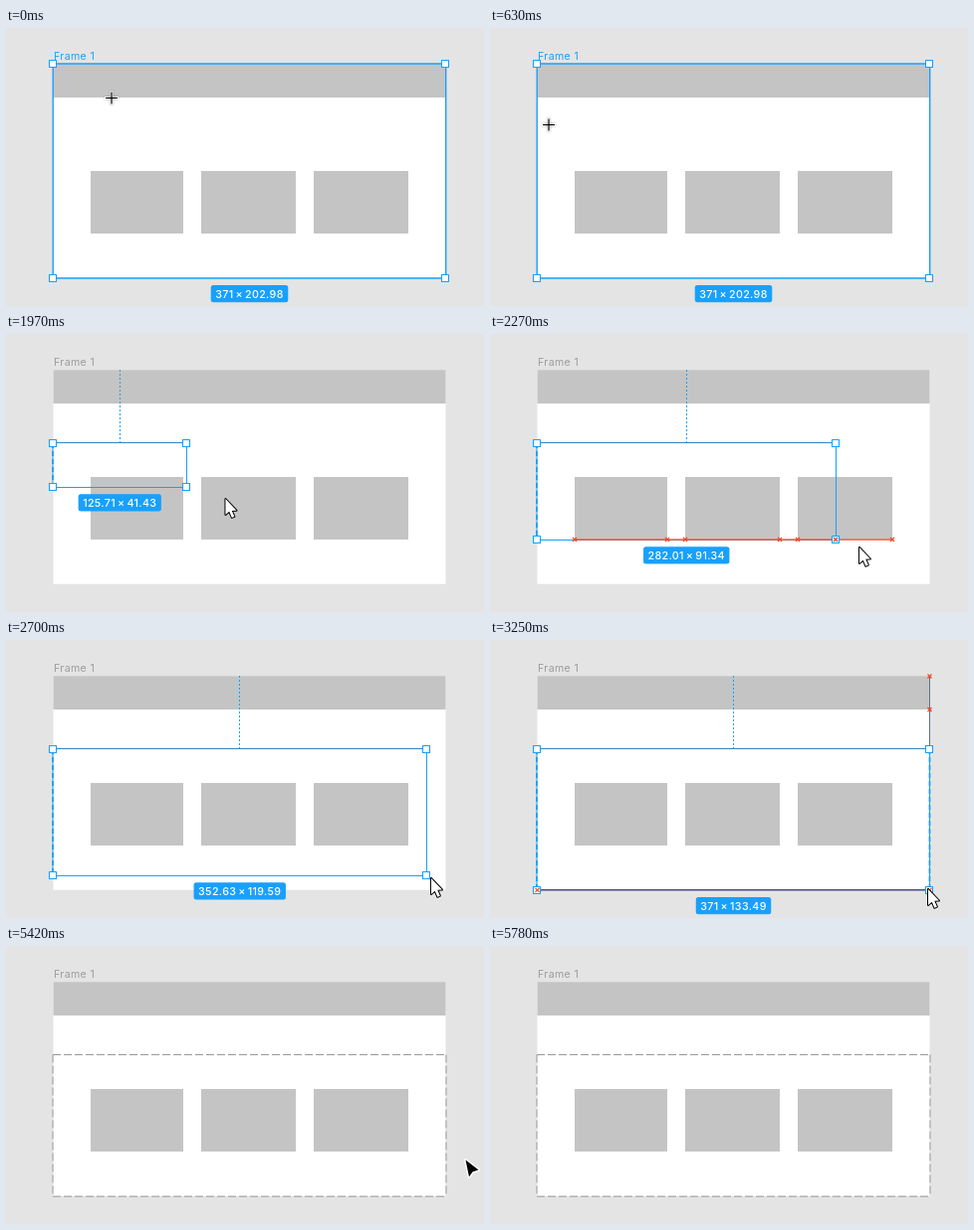
An HTML page with a canvas that plays this animation: 480x280 px, repeating every 6.54 s.

```html
<!DOCTYPE html>
<html lang="en">
<head>
<meta charset="utf-8">
<title>Drawing a slice</title>
<style>
html, body { margin: 0; width: 480px; height: 280px; overflow: hidden; background: #e4e4e4; }
canvas { display: block; }
</style>
</head>
<body>
<canvas id="stage" width="480" height="280"></canvas>
<script>
const ctx = document.getElementById('stage').getContext('2d');
const LOOP = 6540, STEP = 61, ZOOM = 1.062005;
const DRAG = 1730, RELEASE = 3660, DESELECT = 4360;
const BLUE = '#18a0fb', RED = '#f24822', GREY = '#c4c4c4';
const FRAME = { x1: 47.5, y1: 36.2, x2: 441.5, y2: 251.767 };
const SLICE = { x: 47.5, y: 110 };
const CARDS = [[85, 178], [196, 291], [309, 404]];

// Pointer strokes: each curves from where the last one ended
const START = [106, 71];
const MOVES = [
  { from: 60, to: 690, via: [80, 24], end: [54, 115] },
  { from: 750, to: 1060, via: [50, 114], end: [45, 111] },
  { from: DRAG, to: 2340, via: [294.9, 188.8], end: [391.9, 222.1] },
  { from: 2400, to: 3010, via: [439.5, 243.8], end: [437, 250] },
  { from: 3070, to: 3250, via: [439, 250], end: [440, 251] },
  { from: RELEASE, to: 4200, via: [485, 235], end: [461.5, 215.5] },
  { from: 5420, to: 5780, via: [463, 245], end: [458, 290] }
];

const lastMove = t => MOVES.findLastIndex(m => t >= m.from);

// Time of the latest pointer step
function stepTime(t) {
  const m = MOVES[lastMove(t)];
  if (!m) return 0;
  const span = m.to - m.from, n = Math.round(span / STEP);
  const k = Math.min(n, Math.floor((t - m.from) / span * n + 0.2));
  return m.from + span * k / n;
}

function pointer(t) {
  const i = lastMove(t);
  if (i < 0) return START;
  const { from, to, via, end } = MOVES[i];
  const begin = i ? MOVES[i - 1].end : START;
  const u = Math.min(1, (t - from) / (to - from)), v = 1 - u;
  return begin.map((p, j) => v * v * p + 2 * u * v * via[j] + u * u * end[j]);
}

const snap = (v, edge) => Math.abs(v - edge) < 4 ? edge : v;

// The dragged corner trails the pointer by one step, on whole pixels
function corner(t) {
  const [x, y] = pointer(Math.min(t, RELEASE - 1) - STEP).map(Math.round);
  return [
    snap(Math.max(x, SLICE.x + 5), FRAME.x2),
    snap(snap(Math.max(y, SLICE.y + 5), 207), FRAME.y2)
  ];
}

function fill(color, x1, y1, x2, y2) {
  ctx.fillStyle = color;
  ctx.fillRect(x1, y1, x2 - x1, y2 - y1);
}

function line(color, width, x1, y1, x2, y2, dash = []) {
  ctx.strokeStyle = color;
  ctx.lineWidth = width;
  ctx.setLineDash(dash);
  ctx.beginPath();
  ctx.moveTo(x1, y1);
  ctx.lineTo(x2, y2);
  ctx.stroke();
  ctx.setLineDash([]);
}

function box(color, width, x1, y1, x2, y2) {
  ctx.strokeStyle = color;
  ctx.lineWidth = width;
  ctx.strokeRect(x1, y1, x2 - x1, y2 - y1);
}

function handles(x1, y1, x2, y2) {
  for (const x of [x1, x2].map(Math.floor)) for (const y of [y1, y2].map(Math.round)) {
    fill('#fff', x - 3.5, y - 3.5, x + 3.5, y + 3.5);
    box(BLUE, 1.1, x - 3.5, y - 3.5, x + 3.5, y + 3.5);
  }
}

function cross(x, y) {
  line(RED, 1.2, x - 2, y - 2, x + 2, y + 2);
  line(RED, 1.2, x - 2, y + 2, x + 2, y - 2);
}

function write(text, x, y, color, font, align, letter, word) {
  ctx.font = font + ' Inter, sans-serif';
  ctx.letterSpacing = letter;
  ctx.wordSpacing = word;
  ctx.textAlign = align;
  ctx.fillStyle = color;
  ctx.fillText(text, x, y);
  return ctx.measureText(text).width;
}

function sizeBadge(x1, y1, x2, y2) {
  const text = [x2 - x1, y2 - y1].map(v => +(v / ZOOM).toFixed(2)).join(' × ');
  const cx = (x1 + x2) / 2;
  const style = ['500 10.7px', 'center', '0.35px', '-1.2px'];
  const w = write(text, cx, y2 + 20, BLUE, ...style) + 9;
  ctx.fillStyle = BLUE;
  ctx.beginPath();
  ctx.roundRect(cx - w / 2, y2 + 7.2, w, 17.2, 2.5);
  ctx.fill();
  write(text, cx, y2 + 20, '#fff', ...style);
}

function polygon(points, x, y, color, edge, width) {
  ctx.beginPath();
  for (const [px, py] of points) ctx.lineTo(x + px, y + py);
  ctx.closePath();
  ctx.strokeStyle = edge;
  ctx.lineWidth = width;
  ctx.stroke();
  ctx.fillStyle = color;
  ctx.fill();
}

function drawPage(selected) {
  const { x1, y1, x2, y2 } = FRAME;
  fill('#e4e4e4', 0, 0, 480, 280);
  fill('#fff', x1, y1, x2, y2);
  fill(GREY, x1, y1, x2, 70);
  for (const [a, b] of CARDS) fill(GREY, a, 144, b, 207);
  write('Frame 1', 48, 32, selected ? BLUE : '#9c9c9c', '10.6px', 'left', '0.35px', '0px');
  if (selected) {
    box(BLUE, 1.4, x1 - 0.3, y1 - 0.2, x2 + 0.2, y2 + 0.2);
    handles(x1, y1, x2, y2);
    sizeBadge(x1, y1, x2, y2);
  }
}

function drawSlice(t, dragging) {
  const { x, y } = SLICE, [x2, y2] = corner(t);
  const right = Math.floor(x2) + 0.5, bottom = Math.floor(y2) + 0.5;
  const onCards = dragging && y2 === 207;
  const onBottom = dragging && y2 === FRAME.y2;
  const onRight = dragging && x2 === FRAME.x2;

  box(BLUE, 1, x - 0.5, y - 0.5, right, bottom);
  if (dragging) {
    const middle = Math.floor((x + x2) / 2) + 0.5;
    line(BLUE, 1, middle, 36, middle, y, [2, 2]);
    line('#3684bd', 1, x, y - 0.5, right, y - 0.5);
    line(BLUE, 1.8, x - 0.5, y, x - 0.5, y2, [5, 3]);
  }
  if (onRight) {
    line('#64708c', 1, right, 36, right, y);
    line(BLUE, 1.8, right, y, right, y2, [5, 3]);
  }
  if (onCards) line(RED, 1.3, 85, 207.2, 404, 207.2);
  if (onBottom) line('#4b4a86', 1.5, x, 251.8, right, 251.8);
  handles(x, y, x2, y2);
  if (onCards) for (const edge of [...CARDS.flat(), x2]) cross(edge, 207);
  if (onBottom) for (const edge of [x, right]) cross(edge, 251.8);
  if (onRight) for (const edge of [36.5, 70]) cross(right, edge);
  sizeBadge(x, y, x2, y2);
}

function drawDashed() {
  const dash = [8, 3];
  for (const y of [109.5, 252.2]) line('#999', 1, 47, y, 442, y, dash);
  for (const x of [47, 442]) line('#999', 1, x, 109.5, x, 252, dash);
}

function drawCrosshair(x, y) {
  const cx = Math.round(x), cy = Math.round(y) - 0.5;
  ctx.shadowColor = '#0006';
  ctx.shadowBlur = 2;
  for (const [color, width, r] of [['#fff', 3, 7], ['#000', 1.2, 6]]) {
    line(color, width, cx - r, cy, cx + r, cy);
    line(color, width, cx, cy - r, cx, cy + r);
    ctx.shadowBlur = 0;
    ctx.shadowColor = 'transparent';
  }
}

function drawPointer(t) {
  const [x, y] = pointer(t);
  if (t < DRAG) drawCrosshair(x, y);
  else if (t < RELEASE) {
    polygon([[0, 0], [0, 16], [3.7, 12.7], [6.4, 18.8], [8.9, 17.7], [6.3, 11.8], [11, 11.6]],
      x, y, '#fff', '#000', 2);
  } else polygon([[0, 0], [3.5, 17], [7, 12], [13, 10]], x, y, '#000', '#fff', 3);
}

function draw(t) {
  const held = stepTime(t);
  drawPage(t < DRAG);
  if (t >= DESELECT) drawDashed();
  else if (t >= DRAG) drawSlice(held, t < RELEASE);
  drawPointer(held);
}

ctx.lineJoin = 'round';
const start = performance.now();
function tick() {
  draw((performance.now() - start) % LOOP);
  requestAnimationFrame(tick);
}
tick();
</script>
</body>
</html>
```
